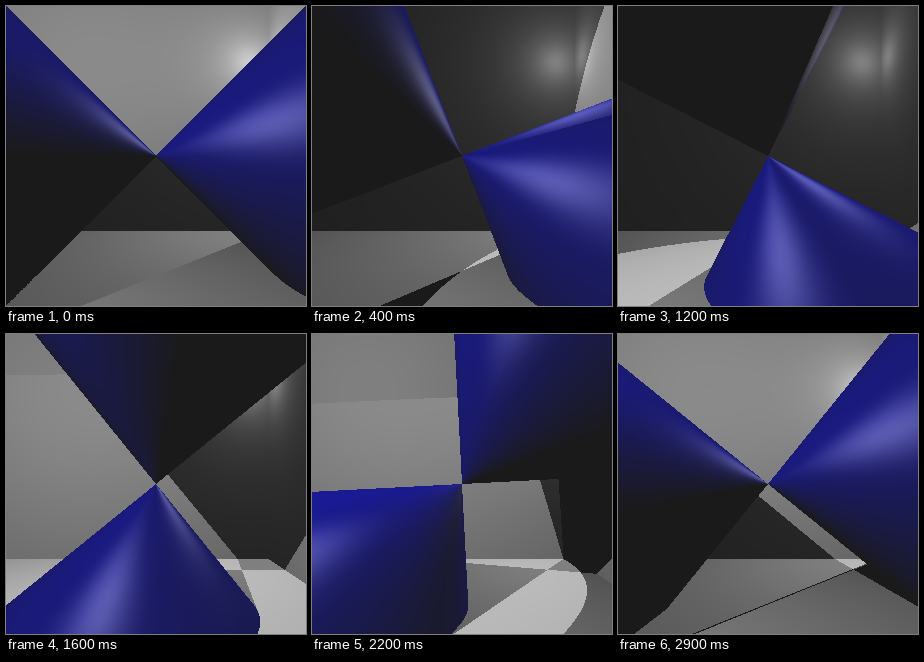
Write an HTML page with a canvas that moves like this. It is 300 by 300 pixels and loops after 3000 ms.

```html
<!DOCTYPE html>
<html lang="en">
<head>
<meta charset="utf-8">
<title>Rotating double cone</title>
<style>
  html, body { margin: 0; width: 100%; height: 100%; overflow: hidden; background: #1a1a1a; }
  canvas { display: block; width: 300px; height: 300px; }
</style>
</head>
<body>
<canvas id="stage" width="300" height="300"></canvas>
<script>
const SIZE = 300, STEPS = 30, STEP_MS = 100;
const FOCAL = 300, EYE_Z = -5;
const FLOOR_Y = -2, BACK_Z = 3, RIGHT_X = 3;
const AMBIENT = 0.1, DIFFUSE = 0.4, SPECULAR = 0.25, SHININESS = 10;
const EPS = 1e-5;
const LIGHTS = [[2.5, 2.5, 2.5], [-2.5, 2.5, -2.5]];
const EYE = [0, 0, EYE_Z];

const ctx = document.getElementById('stage').getContext('2d');
const cache = [];

const dot = (a, b) => a[0] * b[0] + a[1] * b[1] + a[2] * b[2];
const sub = (a, b) => [a[0] - b[0], a[1] - b[1], a[2] - b[2]];
const along = (o, d, t) => [o[0] + d[0] * t, o[1] + d[1] * t, o[2] + d[2] * t];
const unit = v => {
  const len = Math.hypot(v[0], v[1], v[2]) || 1;
  return [v[0] / len, v[1] / len, v[2] / len];
};

// Nearest root only: a light inside the cone still shines out along steep rays.
function hitCone(o, d, axis) {
  const oa = dot(o, axis), da = dot(d, axis);
  const a = da * da - dot(d, d) / 2;
  const b = oa * da - dot(o, d) / 2;
  const c = oa * oa - dot(o, o) / 2;
  const disc = b * b - a * c;
  if (disc < 0) return Infinity;
  const root = Math.sqrt(disc);
  const t = Math.min((-b - root) / a, (-b + root) / a);
  return t > EPS ? t : Infinity;
}

function hitRoom(d) {
  let t = (BACK_Z - EYE_Z) / d[2], normal = [0, 0, -1];
  if (d[1] < 0 && FLOOR_Y / d[1] < t) { t = FLOOR_Y / d[1]; normal = [0, 1, 0]; }
  if (d[0] > 0 && RIGHT_X / d[0] < t) { t = RIGHT_X / d[0]; normal = [-1, 0, 0]; }
  return { t, normal };
}

// Points outwards, away from the axis.
function coneNormal(p, axis) {
  return unit(along(p, axis, -2 * dot(p, axis)));
}

function shade(d, axis) {
  const room = hitRoom(d);
  const coneT = hitCone(EYE, d, axis);
  const onCone = coneT < room.t;
  const p = along(EYE, d, onCone ? coneT : room.t);
  const n = onCone ? coneNormal(p, axis) : room.normal;
  const view = unit(sub(EYE, p));
  let diffuse = 0, specular = 0;
  for (const light of LIGHTS) {
    const toLight = sub(light, p);
    const l = unit(toLight);
    const facing = dot(n, l);
    if (facing <= 0 || hitCone(p, toLight, axis) < 1) continue;
    diffuse += DIFFUSE * facing;
    if (onCone) {
      const mirror = 2 * facing * dot(n, view) - dot(l, view);
      specular += SPECULAR * Math.max(0, mirror) ** SHININESS;
    }
  }
  const base = AMBIENT + specular;
  return onCone ? [base, base + diffuse] : [base + diffuse, base + diffuse];
}

function render(step) {
  const angle = step * Math.PI / STEPS;
  const axis = [Math.cos(angle), -Math.sin(angle), 0];
  const image = ctx.createImageData(SIZE, SIZE);
  let i = 0;
  for (let y = 0; y < SIZE; y++) {
    for (let x = 0; x < SIZE; x++) {
      const ray = [(x + 0.5 - SIZE / 2) / FOCAL, (SIZE / 2 - y - 0.5) / FOCAL, 1];
      const [grey, blue] = shade(ray, axis);
      image.data[i++] = grey * 255;
      image.data[i++] = grey * 255;
      image.data[i++] = blue * 255;
      image.data[i++] = 255;
    }
  }
  return image;
}

let shown = -1;
function tick() {
  const step = Math.floor(performance.now() / STEP_MS) % STEPS;
  if (step !== shown) {
    cache[step] ||= render(step);
    ctx.putImageData(cache[step], 0, 0);
    shown = step;
  }
  requestAnimationFrame(tick);
}
tick();
</script>
</body>
</html>
```
